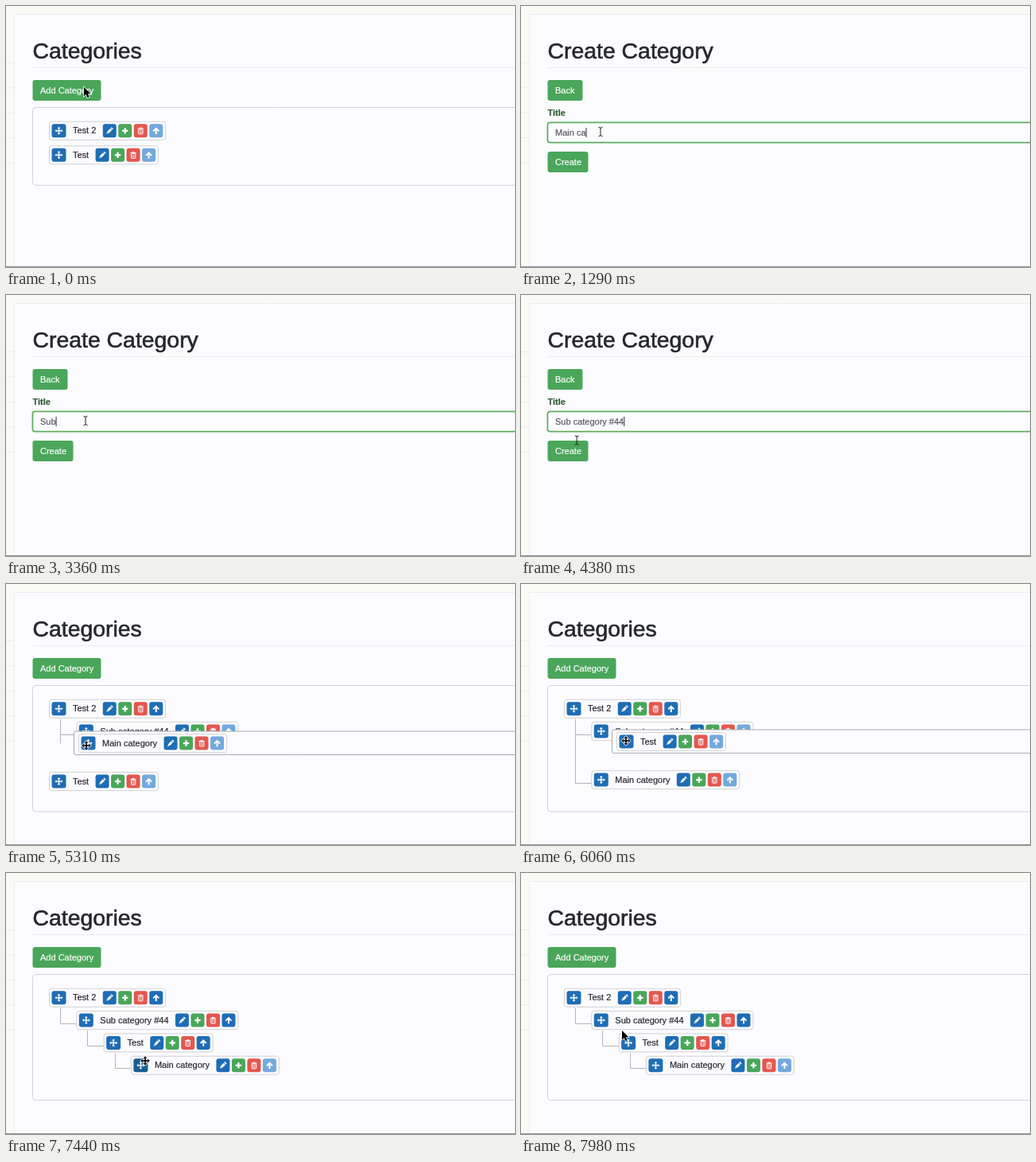
An HTML page with a canvas that plays this animation: 640x328 px, repeating every 8 s.

```html
<!DOCTYPE html>
<html lang="en">
<head>
<meta charset="utf-8">
<title>Category tree</title>
<style>
html, body { margin: 0; width: 100%; height: 100%; overflow: hidden; background: #fcfcfe; }
canvas { display: block; width: 640px; height: 328px; }
</style>
</head>
<body>
<canvas id="stage"></canvas>
<script>
const W = 640, H = 328, LOOP = 8000;
const FONT = '"Liberation Sans", Arial, sans-serif';
const INK = '#24272d', PAPER = '#fcfcfe', EDGE = '#d0d2d6', TWIG = '#b2b4b8';
const BLUE = '#1f6db5', GREEN = '#4aa65a', RED = '#e4574f', PALE = '#74a9dc', WHITE = '#fff';
const LEFT = 54, TOP = 156.8, INDENT = 34.3, ROW = 30.5, CHILD_ROW = 28.3;

const canvas = document.getElementById('stage');
const ctx = canvas.getContext('2d');
const dpr = window.devicePixelRatio || 1;
canvas.width = W * dpr;
canvas.height = H * dpr;

const forms = [
  { from: 500, to: 2000, text: 'Main category' },
  { from: 2750, to: 4650, text: 'Sub category #44' }
];
const drags = [
  { from: 5000, to: 5480, name: 'Main category' },
  { from: 5780, to: 6290, name: 'Test' },
  { from: 6640, to: 7360, name: 'Main category' }
];

// Pointer stops: where it goes and when it gets there.
const TRAVEL = 300;
const stops = [
  { at: 0, x: 98, y: 102 },
  { at: 850, x: 100, y: 158 },
  { at: 1830, x: 60, y: 193 },
  { at: 2400, x: 152, y: 156 },
  { at: 3060, x: 100, y: 158 },
  { at: 4480, x: 60, y: 191 },
  { at: 4940, x: 64, y: 251 },
  { at: 5310, x: 101, y: 203 },
  { at: 5780, x: 66, y: 247 },
  { at: 6060, x: 132, y: 197 },
  { at: 6220, x: 137, y: 203 },
  { at: 6600, x: 104, y: 241 },
  { at: 6960, x: 150, y: 214 },
  { at: 7260, x: 175, y: 236 },
  { at: 7750, x: 127, y: 198 }
];

let mouse, shape, held, time;

const ease = p => p * p * (3 - 2 * p);

function mouseAt(t) {
  const i = stops.findIndex(s => s.at > t);
  if (i < 0) return stops[stops.length - 1];
  const a = stops[i - 1], b = stops[i];
  const start = Math.max(a.at, b.at - TRAVEL);
  const p = ease(Math.max(0, (t - start) / (b.at - start)));
  return { x: a.x + (b.x - a.x) * p, y: a.y + (b.y - a.y) * p };
}

// --- Tree: a flat list of rows with depths; ghosts take no space ---

function place(rows) {
  let y = TOP, last = 0;
  return rows.map((row, i) => {
    if (i && !row.ghost) {
      y += row.depth > last ? CHILD_ROW : ROW + 2 * (last - row.depth);
      last = row.depth;
    }
    return { ...row, y, x: LEFT + INDENT * row.depth };
  });
}

// Lifts a row with the pointer and opens a slot where it would land.
function carry(rows, drag, t) {
  const row = place(rows).find(r => r.name === drag.name);
  const a = mouseAt(drag.from), b = mouseAt(t);
  held = { name: drag.name, x: row.x + b.x - a.x, y: row.y + b.y - a.y };
  const others = place(rows.filter(r => r.name !== drag.name));
  const above = others.filter(r => r.y < held.y);
  const prev = above[above.length - 1], next = others[above.length];
  const wish = Math.floor((held.x - LEFT) / INDENT + 0.05);
  const depth = Math.max(next ? next.depth : 0, Math.min(prev.depth + 1, wish));
  return rows.flatMap(r => {
    const kept = r.name === drag.name ? { ...r, ghost: true } : r;
    return r.name === prev.name ? [kept, { name: drag.name, depth, slot: true }] : [kept];
  });
}

function treeAt(t) {
  let rows = [{ name: 'Test 2', depth: 0 }, { name: 'Test', depth: 0 }];
  if (t >= forms[0].to) rows.push({ name: forms[0].text, depth: 0 });
  if (t >= forms[1].to) rows.splice(1, 0, { name: forms[1].text, depth: 1 });
  for (const drag of drags.filter(d => t >= d.from)) {
    rows = carry(rows, drag, Math.min(t, drag.to));
    if (t < drag.to) break;
    held = null;
    rows = rows.filter(r => !r.ghost).map(({ name, depth }) => ({ name, depth }));
  }
  return place(rows);
}

// --- Drawing helpers ---

function box(x, y, w, h, r, fill, stroke, line = 1) {
  ctx.beginPath();
  ctx.roundRect(x, y, w, h, r);
  if (fill) { ctx.fillStyle = fill; ctx.fill(); }
  if (stroke) { ctx.strokeStyle = stroke; ctx.lineWidth = line; ctx.stroke(); }
}

function path(points, color, width = 1) {
  ctx.beginPath();
  for (const [x, y] of points) ctx.lineTo(x, y);
  ctx.strokeStyle = color;
  ctx.lineWidth = width;
  ctx.stroke();
}

const rule = (x0, y0, x1, y1, color, width) => path([[x0, y0], [x1, y1]], color, width);

function write(str, x, y, size, color, heft, weight = '') {
  ctx.font = `${weight} ${size}px ${FONT}`;
  ctx.fillStyle = ctx.strokeStyle = color;
  ctx.lineWidth = heft;
  ctx.fillText(str, x, y);
  ctx.strokeText(str, x, y);
}

const label = (str, x, y, color = INK, weight) => write(str, x, y, 11, color, 0.2, weight);

// Paints a button face and sets the pointer shape when it is under the pointer.
function face(x, y, w, h, color, pointer) {
  const over = !held && time > 120 && mouse.x >= x && mouse.x <= x + w && mouse.y >= y && mouse.y <= y + h;
  box(x, y, w, h, 3, color);
  if (!over) return;
  shape = pointer;
  box(x, y, w, h, 3, 'rgba(0, 30, 0, 0.18)');
}

function fourArrows(reach, head, width, color) {
  ctx.fillStyle = color;
  for (let i = 0; i < 4; i++) {
    ctx.fillRect(-width, -reach + head, 2 * width, reach - head);
    ctx.beginPath();
    ctx.moveTo(0, -reach);
    ctx.lineTo(head, head - reach);
    ctx.lineTo(-head, head - reach);
    ctx.fill();
    ctx.rotate(Math.PI / 2);
  }
}

const icons = {
  move: () => fourArrows(5, 2, 0.75, WHITE),
  pencil() {
    ctx.rotate(Math.PI / 4);
    rule(0, -5, 0, -3.3, WHITE, 3);
    rule(0, -2.6, 0, 3, WHITE, 3);
    rule(0, 3, 0, 5, WHITE, 1.4);
  },
  plus() {
    rule(-3.7, 0, 3.7, 0, WHITE, 2.2);
    rule(0, -3.7, 0, 3.7, WHITE, 2.2);
  },
  trash() {
    rule(-3.7, -2.7, 3.7, -2.7, WHITE);
    rule(-1.4, -3.7, 1.4, -3.7, WHITE);
    box(-2.7, -1.9, 5.4, 6, 0.8, null, WHITE);
    for (const x of [-0.9, 0.9]) rule(x, -1, x, 3.2, WHITE, 0.7);
  },
  up() {
    rule(0, -3, 0, 4.3, WHITE, 2);
    path([[-3.6, 0.6], [0, -3], [3.6, 0.6]], WHITE, 1.9);
  }
};

function iconButton(icon, cx, cy, color, w = 17, pointer = 'hand') {
  face(cx - w / 2, cy - 8.5, w, 17, color, pointer);
  ctx.save();
  ctx.translate(cx, cy);
  icons[icon]();
  ctx.restore();
}

function textButton(str, y, w) {
  face(33.5, y, w, 26, GREEN, 'hand');
  label(str, 43, y + 17, WHITE);
}

function item(name, x, cy, open) {
  ctx.font = `11px ${FONT}`;
  const tools = x + 38.4 + ctx.measureText(name).width;
  box(x + 0.5, cy - 11.5, tools + 78.4 - x, 23, 3, PAPER, EDGE);
  iconButton('move', x + 12.5, cy, BLUE, 18, 'move');
  label(name, x + 30, cy + 3.5);
  const colors = { pencil: BLUE, plus: GREEN, trash: RED, up: open ? BLUE : PALE };
  Object.keys(colors).forEach((icon, i) => iconButton(icon, tools + 8.5 + 19.5 * i, cy, colors[icon]));
}

function branch(rows, i) {
  const row = rows[i];
  let end = i + 1;
  while (end < rows.length && rows[end].depth > row.depth) end++;
  const hasNext = end < rows.length && rows[end].depth === row.depth;
  const tail = rows[end - 1];
  const x = Math.round(row.x - 20.3) + 0.5, y = Math.round(row.y + 3.7) + 0.5;
  const bottom = hasNext ? tail.y + 15.3 + 2 * (tail.depth - row.depth) : y;
  if (hasNext || !row.slot) rule(x, row.y - 15.3, x, bottom, TWIG);
  if (!row.slot) rule(x, y, row.x, y, TWIG);
}

// --- Pages ---

function heading(str) {
  write(str, 33.5, 66, 28.4, INK, 0.6);
  rule(34, 77.5, W, 77.5, '#ececf0');
}

function listPage(rows) {
  const last = rows.filter(r => !r.ghost).pop();
  heading('Categories');
  textButton('Add Category', 93, 86);
  box(33.5, 127.5, W, last.y + 2 * last.depth - 89.5, 4, null, EDGE);
  rows.forEach((row, i) => {
    if (row.ghost) return;
    if (row.depth) branch(rows, i);
    const next = rows[i + 1];
    if (!row.slot) item(row.name, row.x, row.y, next && next.depth > row.depth && !next.slot);
  });
  if (!held) return;
  box(held.x - 5.5, held.y - 15, W, 29.5, 2, PAPER, '#a8aaae');
  item(held.name, held.x, held.y, false);
}

function formPage(form) {
  const age = time - form.from;
  const focus = age > 350;
  const typed = form.text.slice(0, Math.max(0, Math.floor((age - 420) / 48)));
  heading('Create Category');
  textButton('Back', 93, 44);
  label('Title', 33.5, 138, '#2f5a34', 'bold');
  if (focus) box(33.5, 146.5, W, 25, 3, null, '#dcefdc', 4);
  box(33.5, 146.5, W, 25, 3, PAPER, focus ? '#5aa85c' : EDGE, focus ? 1.5 : 1);
  label(typed, 43, 162.5, '#55585c');
  if (focus) {
    const x = 43.5 + ctx.measureText(typed).width;
    rule(x, 153, x, 165, INK);
  }
  textButton('Create', 183, 51);
  if (mouse.y > 146 && mouse.y < 183) shape = 'beam';
}

const pointers = {
  arrow() {
    const outline = new Path2D('M0 0V11.5L2.7 9 4.6 13.2 6.6 12.3 4.8 8.3H8.4Z');
    ctx.strokeStyle = WHITE;
    ctx.lineWidth = 1.4;
    ctx.stroke(outline);
    ctx.fillStyle = '#000';
    ctx.fill(outline);
  },
  hand() {
    const outline = new Path2D('M-1 -1H1V3L6 4.5V8L5 11H0L-4 6.4-1 6.5Z');
    ctx.fillStyle = WHITE;
    ctx.fill(outline);
    ctx.strokeStyle = '#111';
    ctx.lineWidth = 1;
    ctx.stroke(outline);
  },
  beam() {
    rule(0, -5, 0, 5, '#222');
    for (const s of [-1, 1]) path([[-2.5, 5.8 * s], [0, 4.7 * s], [2.5, 5.8 * s]], '#222');
  },
  move() {
    fourArrows(6.7, 3.5, 1.7, WHITE);
    fourArrows(5.7, 2.4, 0.8, '#000');
  }
};

function backdrop() {
  ctx.fillStyle = '#fbfbf6';
  ctx.fillRect(0, 0, W, H);
  for (let i = 0; i < 5; i++) rule(0, 71.5 + 31.4 * i, 10, 71.5 + 31.4 * i, '#eeeee6');
  box(10.5, 10.5, W, H, 0, PAPER, '#ededf0');
}

function draw(t) {
  time = t;
  mouse = mouseAt(t);
  shape = 'arrow';
  held = null;
  ctx.setTransform(dpr, 0, 0, dpr, 0, 0);
  backdrop();
  const form = forms.find(f => t >= f.from && t < f.to);
  if (form) formPage(form);
  else listPage(treeAt(t));
  if (held) shape = 'move';
  rule(0, 327.5, W, 327.5, '#96969a');
  ctx.translate(mouse.x, mouse.y);
  pointers[shape]();
}

const begin = performance.now();
function tick() {
  draw((performance.now() - begin) % LOOP);
  requestAnimationFrame(tick);
}
tick();
</script>
</body>
</html>
```
